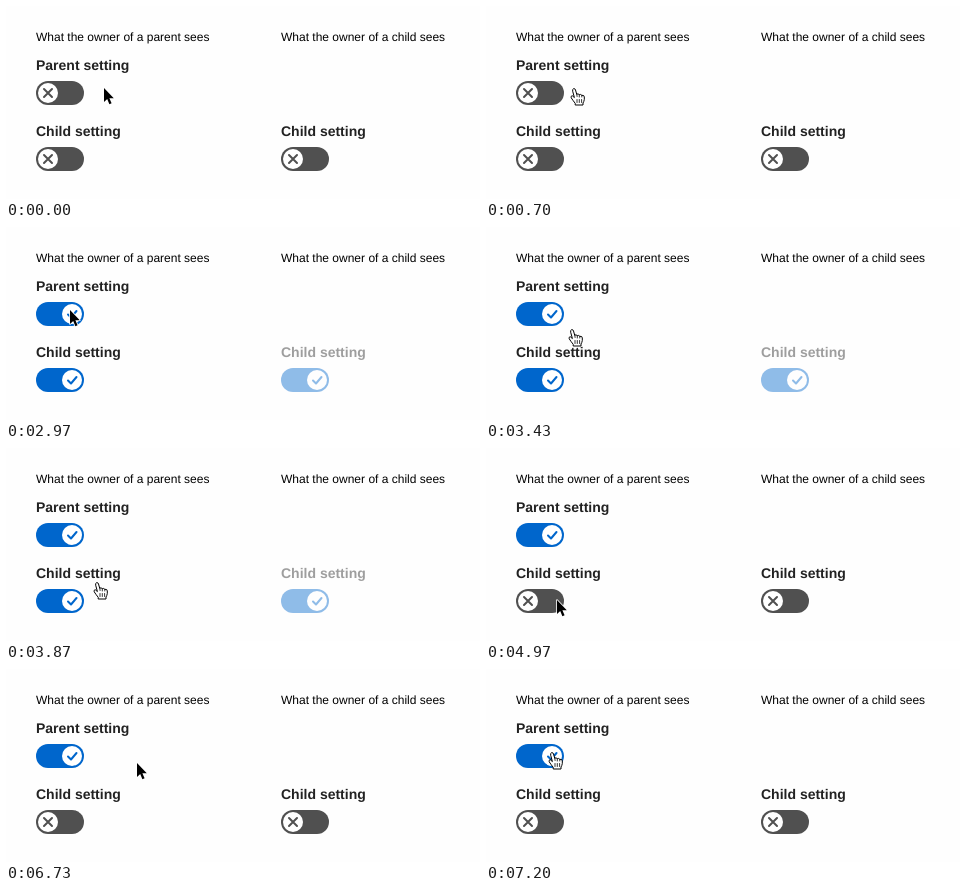
An HTML page for the animation above (8000 ms loop, 474x193 px).

```html
<!DOCTYPE html>
<html lang="en">
<head>
<meta charset="utf-8">
<title>Parent and child settings</title>
<style>
  html, body { margin: 0; width: 100%; height: 100%; overflow: hidden; background: #fefefe; }
  svg { display: block; width: 474px; height: 193px; font: 12px "Liberation Sans", Arial, sans-serif; text-rendering: geometricPrecision; }
  .label { font-size: 14px; font-weight: bold; fill: #222; }
  .setting { --color: #505050; }
  .on { --color: #06c; }
  .track { fill: var(--color); }
  .icon { fill: none; stroke: var(--color); stroke-width: 2; stroke-linecap: round; stroke-linejoin: round; }
  .on .cross, .setting:not(.on) .check { display: none; }
  .on .knob { transform: translateX(24px); }
  .disabled { opacity: .43; }
</style>
</head>
<body>
<svg viewBox="0 0 474 193">
  <defs>
    <path id="arrow" d="M0 0V14L3.2 11L5.4 16.3L7.6 15.3L5.4 10.3H9.8Z" stroke="#fff" stroke-width="1.6" stroke-linejoin="round" paint-order="stroke"/>
    <g id="hand" stroke="#000" stroke-linejoin="round" stroke-linecap="round">
      <path fill="#fff" d="M-3.4 1.8Q-3.7 0 -2.3 -.4Q-.9 -.6 -.5 1L.7 5.2Q2.2 4.2 3.2 5.7Q4.8 4.9 5.8 6.3Q8.3 5.9 8.3 8V10.5Q8 12.5 7 14V16H-.8V14.3Q-2.8 11.8 -4.8 8.8Q-5.3 6.8 -3.8 6.7L-1.9 8.3Z"/>
      <path stroke-width=".8" d="M.8 5.2L1.1 7.5M3.3 6V8M5.8 6.5V8M1 10.5V13.5M3.3 10.5V13.5M5.6 10.5V13.5"/>
    </g>
  </defs>
  <text x="30" y="35">What the owner of a parent sees</text>
  <text x="275" y="35">What the owner of a child sees</text>
  <g id="settings"></g>
  <use id="cursor"/>
</svg>
<script>
const LOOP = 8000;
const PARENT_CLICK = 2200, CHILD_CLICK = 4970;

// Pointer stops, and the eased moves between them; "bend" holds the control points of an arc
const start = [98, 82], parentEdge = [90, 83], parentHover = [61, 84];
const parentSpot = [64, 83], childSpot = [71, 152], parentAgain = [68, 84];
const moves = [
  { begin: 200, end: 500, from: start, to: parentEdge },
  { begin: 670, end: 900, from: parentEdge, to: parentHover },
  { begin: 2140, end: 2230, from: parentHover, to: parentSpot },
  { begin: 2970, end: 4370, from: parentSpot, to: childSpot, bend: [[105, 111], [107, 134]] },
  { begin: 6000, end: 7200, from: childSpot, to: parentAgain, bend: [[134, 154], [175, 65]] }
];

const settings = document.getElementById('settings');
const cursor = document.getElementById('cursor');

function addSetting(name, x, y) {
  settings.insertAdjacentHTML('beforeend', `
    <g class="setting" transform="translate(${x} ${y})">
      <text class="label" y="5">${name}</text>
      <rect class="track" y="16" width="48" height="24" rx="12"/>
      <g class="knob">
        <circle cx="12" cy="28" r="10" fill="#fff"/>
        <path class="icon cross" d="M8 24l8 8m0-8l-8 8"/>
        <path class="icon check" d="M8 28.5l3 3l5.5-6.5"/>
      </g>
    </g>`);
  return settings.lastElementChild;
}

const parent = addSetting('Parent setting', 30, 59);
const child = addSetting('Child setting', 30, 125);
const childView = addSetting('Child setting', 275, 125);

const clamp = u => Math.min(1, Math.max(0, u));
const smooth = u => u * u * (3 - 2 * u);

function pointerAt(t) {
  const { begin, end, from, to, bend = [from, to] } = moves.findLast(m => t >= m.begin) || moves[0];
  const u = smooth(clamp((t - begin) / (end - begin))), v = 1 - u;
  return [0, 1].map(axis => Math.round(
    v ** 3 * from[axis] + 3 * v * v * u * bend[0][axis] +
    3 * v * u * u * bend[1][axis] + u ** 3 * to[axis]));
}

function draw(t) {
  const parentOn = t >= PARENT_CLICK;
  const childOn = parentOn && t < CHILD_CLICK;
  parent.classList.toggle('on', parentOn);
  child.classList.toggle('on', childOn);
  childView.classList.toggle('on', childOn);
  childView.classList.toggle('disabled', childOn);

  // A click resets the pointer to an arrow until it moves again
  const [x, y] = pointerAt(t);
  const reset = (parentOn && t < 3000) || (t >= CHILD_CLICK && t < 6030);
  const hovering = x < 98 && (y < 107 || y > 132);
  cursor.setAttribute('href', hovering && !reset ? '#hand' : '#arrow');
  cursor.setAttribute('transform', `translate(${x} ${y})`);
}

function tick() {
  draw(performance.now() % LOOP);
  requestAnimationFrame(tick);
}
tick();
</script>
</body>
</html>
```
